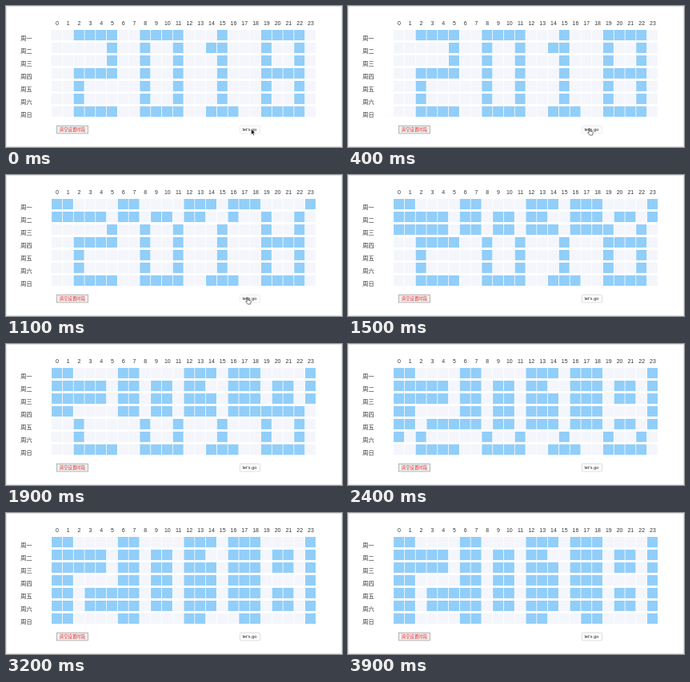
These frames come from a looping animation (420x177 px, 4000 ms). An HTML page:

```html
<!DOCTYPE html>
<html lang="zh">
<head>
<meta charset="utf-8">
<style>
  html, body { margin: 0; width: 100%; height: 100%; overflow: hidden; background: #fff; }
  svg { display: block; width: 100vw; height: 100vh; }
  text { font-family: "Liberation Sans", "Noto Sans CJK SC", "Noto Sans CJK", sans-serif; fill: #333; }
  .hour { font-size: 7px; text-anchor: middle; }
  .day { font-size: 7.2px; }
  .cell { fill: #f4f6fc; }
  .cell.on { fill: #91cef9; }
  .clear { font-size: 5.4px; fill: #e02a2a; }
  .go { font-size: 5.7px; fill: #222; }
</style>
</head>
<body>
<svg id="stage" viewBox="0 0 420 177">
  <rect x=".5" y=".5" width="419" height="176" fill="#fff" stroke="#e2e2e2"/>
  <g id="grid"></g>
  <rect x="63.5" y="150.5" width="39" height="9.5" fill="#efefef" stroke="#a6a6a6" stroke-width=".8"/>
  <text class="clear" x="66.8" y="157.3">清空设置时段</text>
  <rect id="button" x="292.5" y="150.5" width="25" height="9.5" rx="1" fill="#fff" stroke="#d6d6d6" stroke-width=".7"/>
  <text class="go" x="295.6" y="157.2">let's go</text>
  <path id="arrow" d="M0 0V7.2L1.7 5.7 2.8 8.2 4 7.7 2.9 5.2H5.2Z" fill="#111" stroke="#fff" stroke-width=".5"/>
  <path id="hand" d="M1.7 .6Q2.7 0 2.9 1V3.5L6.2 4.2Q7 4.5 6.8 5.6L6 8.6H2.7L.2 5.5Q.2 4.5 1.7 5.3Z" fill="#fff" stroke="#222" stroke-width=".65"/>
</svg>
<script>
const NS = "http://www.w3.org/2000/svg";
const LOOP = 4000, TICK = 100, COLS = 24, PITCH = 13.78;
const $ = id => document.getElementById(id);
const grid = $("grid");

function add(tag, attrs, label) {
  const el = document.createElementNS(NS, tag);
  for (const key in attrs) el.setAttribute(key, attrs[key]);
  if (label !== undefined) el.textContent = label;
  return grid.appendChild(el);
}

// The calendar spells a year; the sweep inverts it cell by cell.
const pattern = [
  "..####..####...#...####.",
  ".....#..#..#..##...#..#.",
  ".....#..#..#...#...#..#.",
  "..####..#..#...#...####.",
  "..#.....#..#...#...#..#.",
  "..#.....#..#...#...#..#.",
  "..####..####..###..####."
].join("");

for (let c = 0; c < COLS; c++)
  add("text", { class: "hour", x: 64 + c * PITCH, y: 24.2 }, c);
[..."一二三四五六日"].forEach((d, r) =>
  add("text", { class: "day", x: 18.2, y: 43.4 + r * 15.9 }, "周" + d));

const cells = [...pattern].map((_, i) => add("rect", {
  x: 57.1 + (i % COLS) * PITCH,
  y: 30 + Math.floor(i / COLS) * 16,
  width: 13, height: 13.1
}));

// Piecewise linear interpolation through [time, value] pairs.
function track(points, t) {
  if (t <= points[0][0]) return points[0][1];
  for (let i = 1; i < points.length; i++) {
    const [t0, v0] = points[i - 1], [t1, v1] = points[i];
    if (t <= t1) return v0 + (v1 - v0) * (t - t0) / (t1 - t0);
  }
  return points[points.length - 1][1];
}

const sweep = [[450, 0], [700, 15], [1500, 67], [1900, 91], [2400, 121], [2800, 144], [3200, 168]];
const cursorX = [[0, 306.5], [400, 299.5]];
const cursorY = [[0, 154.3], [400, 153.5]];

function draw(t) {
  const done = Math.floor(track(sweep, t) + 1e-6);
  cells.forEach((cell, i) => {
    const on = (pattern[i] === "#") !== (i < done);
    cell.setAttribute("class", on ? "cell on" : "cell");
  });
  const place = `translate(${track(cursorX, t)} ${track(cursorY, t)})`;
  $("arrow").setAttribute("transform", place);
  $("hand").setAttribute("transform", place);
  $("arrow").style.display = t < 200 ? "" : "none";
  $("hand").style.display = t >= 200 && t < 1200 ? "" : "none";
  $("button").setAttribute("stroke", t < 1200 ? "#e6e6e6" : "#cfcfcf");
}

const start = performance.now();
function frame() {
  const t = (performance.now() - start) % LOOP;
  draw(Math.floor(t / TICK) * TICK);
  requestAnimationFrame(frame);
}
frame();
</script>
</body>
</html>
```
